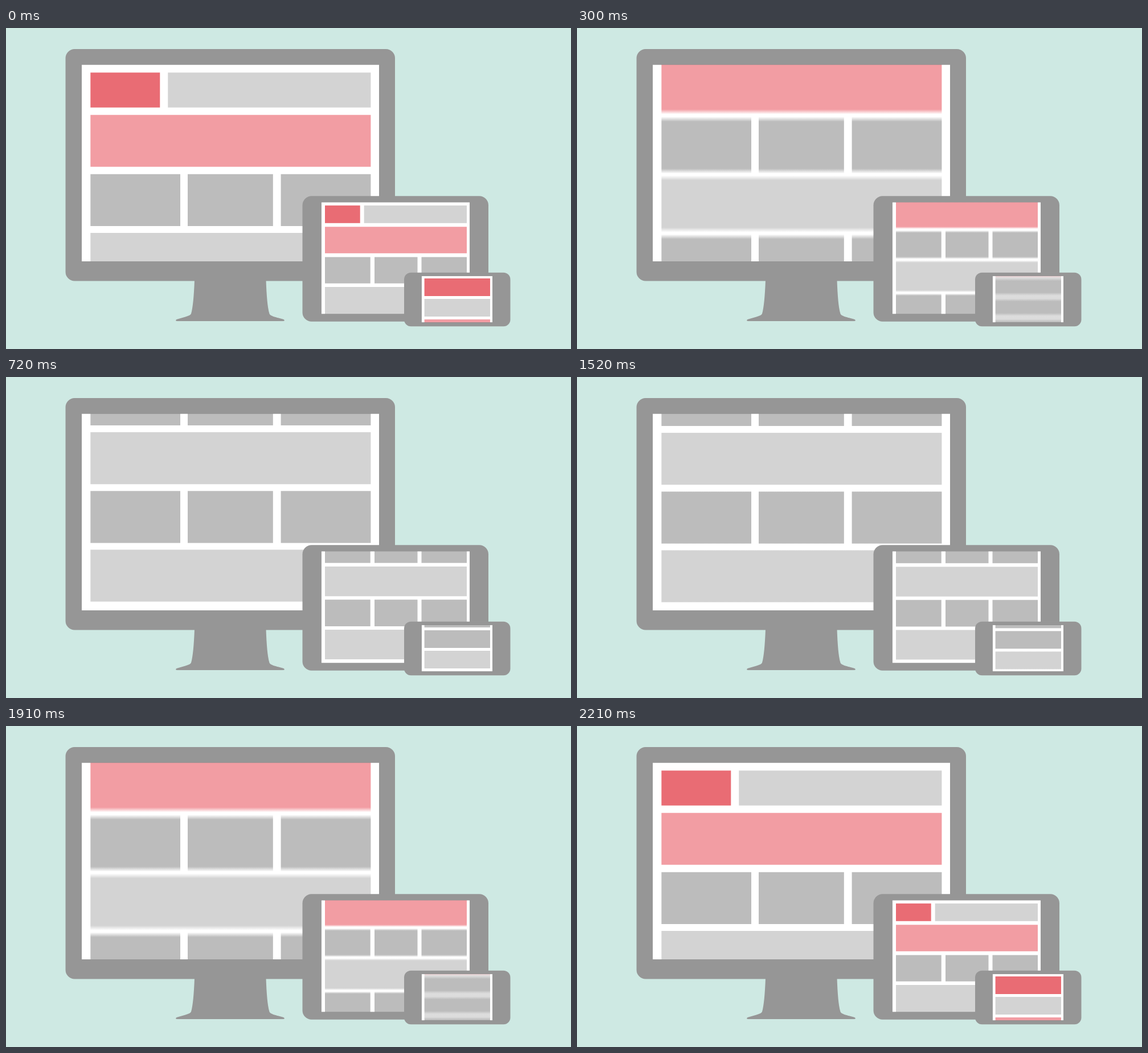
These frames come from a looping animation (992 by 564 pixels, 3.01 s). An HTML page with a canvas:

```html
<!DOCTYPE html>
<html lang="en">
<head>
<meta charset="utf-8">
<title>Responsive layout on three screens</title>
<style>
  html, body { margin: 0; width: 100%; height: 100%; overflow: hidden; background: #cee9e3; }
  canvas { display: block; width: 100%; height: 100%; }
</style>
</head>
<body>
<canvas id="stage" width="992" height="564"></canvas>
<script>
const ctx = document.getElementById('stage').getContext('2d');

const BACK = '#cee9e3', CASE = '#969696';
const RED = '#e96c74', PINK = '#f29da3', LIGHT = '#d3d3d3', DARK = '#bcbcbc';

const STEP = 30, STEPS = 24, LOOP = 3010, RETURN = 1490;

// Blocks are [left, right, top, bottom, colour].
function widePage(head, cols, tops) {
  const left = cols[0][0], right = cols[2][1];
  const full = ([top, bottom], color) => [[left, right, top, bottom, color]];
  const thirds = ([top, bottom]) => cols.map(([a, b]) => [a, b, top, bottom, DARK]);
  return [
    [left, head[0], ...tops[0], RED],
    [head[1], right, ...tops[0], LIGHT],
    ...full(tops[1], PINK),
    ...thirds(tops[2]), ...full(tops[3], LIGHT),
    ...thirds(tops[4]), ...full(tops[5], LIGHT)
  ];
}

function stackedPage(left, right, top) {
  const colors = [RED, LIGHT, PINK, DARK, DARK, DARK, LIGHT, DARK, DARK, DARK, LIGHT];
  return colors.map(color => {
    const bottom = top + (color === PINK ? 44 : 31);
    const block = [left, right, top, bottom, color];
    top = bottom + 5;
    return block;
  });
}

const devices = [
  {
    body: [104.5, 37, 578.5, 407.5, 16],
    screen: [133, 64.5, 522, 345.5],
    travel: 263,
    blocks: widePage([270.3, 284.3], [[148.3, 306], [319, 468.8], [482.6, 640.4]],
      [[78.3, 139.7], [152.7, 243.8], [256.8, 348], [360, 451.3], [463.3, 554.6], [566.4, 657.6]])
  },
  {
    body: [520.5, 295.3, 326.5, 220.4, 16],
    screen: [553.7, 306.2, 260.5, 196.3],
    travel: 122,
    blocks: widePage([621.7, 628.7], [[560, 639.7], [647, 722.5], [729.5, 809]],
      [[311.8, 342.8], [349.3, 395.8], [402.5, 448.7], [455, 507.2], [513.2, 560], [566, 618]])
  },
  {
    body: [699, 429.8, 186.5, 94.4, 12],
    screen: [729.7, 435.8, 124.3, 81.4],
    travel: 332,
    blocks: stackedPage(734.6, 850, 440)
  }
];

const stand = new Path2D(
  'M331 443C330 470 328 492 325 502C324 505 317 507 299.5 512Q296 515 301 515' +
  'H486Q491 515 487.5 512C470 507 464 506 462.5 502C459 490 457.5 470 456.5 443Z');

// Symmetric cubic ease with handles at 0.38 and 0.62.
function ease(x) {
  if (x <= 0) return 0;
  if (x >= 1) return 1;
  let lo = 0, hi = 1;
  for (let i = 0; i < 30; i++) {
    const s = (lo + hi) / 2, r = 1 - s;
    if (1.14 * s * r * r + 1.86 * s * s * r + s * s * s < x) lo = s; else hi = s;
  }
  return lo * lo * (3 - 2 * lo);
}

function stepAt(t) {
  const n = t < RETURN ? Math.floor(t / STEP) : STEPS - Math.floor((t - RETURN) / STEP);
  return Math.max(0, Math.min(STEPS, n));
}

// A block smeared vertically by `blur` pixels has linear ramps at both ends.
function drawBlock([left, right, top, bottom, color], offset, blur) {
  let y0 = top - offset, y1 = bottom - offset;
  ctx.fillStyle = color;
  if (blur > 1) {
    y0 -= blur / 2;
    y1 += blur / 2;
    const ramp = blur / (y1 - y0);
    const fade = ctx.createLinearGradient(0, y0, 0, y1);
    fade.addColorStop(0, color + '00');
    fade.addColorStop(ramp, color);
    fade.addColorStop(1 - ramp, color);
    fade.addColorStop(1, color + '00');
    ctx.fillStyle = fade;
  }
  ctx.fillRect(left, y0, right - left, y1 - y0);
}

function drawDevice({ body, screen, travel, blocks }, place, smear) {
  ctx.fillStyle = CASE;
  ctx.beginPath();
  ctx.roundRect(...body);
  ctx.fill();
  ctx.save();
  ctx.beginPath();
  ctx.rect(...screen);
  ctx.clip();
  ctx.fillStyle = '#fff';
  ctx.fillRect(...screen);
  ctx.globalCompositeOperation = 'multiply';
  for (const block of blocks) drawBlock(block, place * travel, smear * travel);
  ctx.restore();
}

function draw(t) {
  const n = stepAt(t);
  const place = ease(n / STEPS);
  // Half-step shutter centred on the current pose.
  const smear = ease((n + 0.25) / STEPS) - ease((n - 0.25) / STEPS);
  ctx.fillStyle = BACK;
  ctx.fillRect(0, 0, 992, 564);
  ctx.fillStyle = CASE;
  ctx.fill(stand);
  for (const device of devices) drawDevice(device, place, smear);
}

const start = performance.now();
function tick() {
  draw((performance.now() - start) % LOOP);
  requestAnimationFrame(tick);
}
tick();
</script>
</body>
</html>
```
